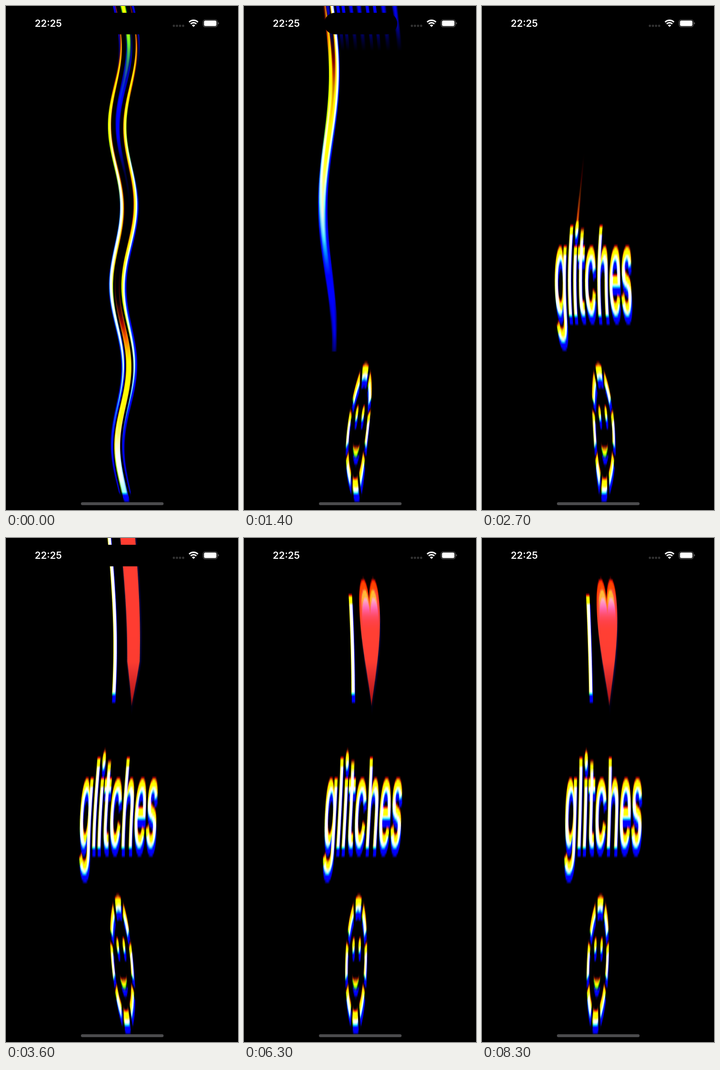
Animation of 480x1041 px, one loop 8.4 s. Source, as an HTML page with a canvas:

```html
<!DOCTYPE html>
<html lang="en">
<head>
<meta charset="utf-8">
<title>I love glitches</title>
<style>
  html, body { margin: 0; width: 100%; height: 100%; overflow: hidden; background: #000; }
  canvas, svg { position: absolute; left: 0; top: 0; width: 480px; height: 1041px; }
  text { font: 600 20px Inter, Roboto, sans-serif; fill: #fff; }
</style>
</head>
<body>
<canvas id="stage" width="480" height="1041"></canvas>
<svg viewBox="0 0 480 1041">
  <rect x="166" y="14" width="151" height="44.5" rx="22"/>
  <text x="87.5" y="43" text-anchor="middle">22:25</text>
  <g fill="#333">
    <circle cx="347.3" cy="41" r="2.4"/><circle cx="353.7" cy="41" r="2.4"/>
    <circle cx="360.1" cy="41" r="2.4"/><circle cx="366.5" cy="41" r="2.4"/>
  </g>
  <g fill="none" stroke="#fff" stroke-width="2.8">
    <path d="M378.8 33.3a13 13 0 0 1 18.4 0M382.1 36.9a8.4 8.4 0 0 1 11.8 0"/>
  </g>
  <path fill="#fff" d="M388 43.3l-3.4-3.4a4.8 4.8 0 0 1 6.8 0z"/>
  <rect x="407.7" y="28.2" width="29.6" height="15" rx="4.6" fill="none" stroke="#666" stroke-width="1.1"/>
  <rect x="409.6" y="30" width="25.8" height="11.4" rx="3" fill="#fff"/>
  <path fill="#666" d="M438.6 33.3q2 .8 2 2.4t-2 2.4z"/>
  <rect x="155" y="1025" width="171" height="6" rx="3" fill="#4b4b4d"/>
</svg>
<script>
const W = 480, H = 1041;
const STRETCH = 6;        // vertical stretch of the artwork
const LOOP = 8400, STEP = 100;
const HELD = [23, 53, 60, 75];   // steps that repeat the one before

// Colour channels and how far each is pulled aside
const CHANNELS = [
  { color: '#f00', dx: 0, dy: -4 },
  { color: '#0f0', dx: 0, dy: 0 },
  { color: '#00f', dx: 1, dy: 16 }
];

function makeCanvas(w, h) {
  const c = document.createElement('canvas');
  c.width = w;
  c.height = h;
  return c.getContext('2d');
}

function heartPath(c) {
  c.beginPath();
  for (const s of [-1, 1]) {
    c.moveTo(0, 21.5);
    c.bezierCurveTo(2 * s, 17, 6 * s, 14.7, 10.5 * s, 14.7);
    c.bezierCurveTo(17 * s, 14.7, 21 * s, 19, 21 * s, 25.5);
    c.bezierCurveTo(21 * s, 37, 7 * s, 49, 0, 58.3);
    c.closePath();
  }
}

function drawHeart(c) {
  c.save();
  c.translate(252, 0);
  const body = c.createLinearGradient(0, 15, 0, 58);
  body.addColorStop(0, '#ff4638');
  body.addColorStop(0.65, '#ff3c30');
  body.addColorStop(1, '#a80c0a');
  c.fillStyle = body;
  heartPath(c);
  c.fill();

  const shine = c.createLinearGradient(0, 15, 0, 30);
  shine.addColorStop(0, 'rgba(255,205,215,.9)');
  shine.addColorStop(0.25, 'rgba(255,200,212,.85)');
  shine.addColorStop(0.5, 'rgba(255,190,205,.3)');
  shine.addColorStop(1, 'rgba(255,60,48,0)');
  c.fillStyle = shine;
  c.translate(0, 5.65);
  c.scale(0.82, 0.82);
  heartPath(c);
  c.fill();
  c.restore();
}

function drawFace(c) {
  c.save();
  c.translate(242, 145.8);
  c.strokeStyle = c.fillStyle = '#fff';
  c.lineWidth = 5;
  const half = 16.5 * Math.PI / 180;
  for (let i = 0; i < 8; i++) {
    const a = i * Math.PI / 4;
    c.beginPath();
    c.arc(0, 0, 19.8, a - half, a + half);
    c.stroke();
  }
  for (const x of [-6.4, 6.4]) {
    c.beginPath();
    c.ellipse(x, -5.2, 2.5, 2.5, 0, 0, 7);
    c.fill();
  }
  c.beginPath();
  c.moveTo(-7.3, 5.6);
  c.quadraticCurveTo(0, 8, 7.3, 5.6);
  c.quadraticCurveTo(0, 13.4, -7.3, 5.6);
  c.fill();
  c.restore();
}

function drawWord(c, word, x, y, size) {
  c.font = `700 ${size}px Inter, Roboto, sans-serif`;
  c.textAlign = 'center';
  c.fillStyle = '#fff';
  c.fillText(word, x, y);
}

// Flat artwork, then stretched with its colour channels pulled apart
function makeArt() {
  const flat = makeCanvas(W, Math.ceil(H / STRETCH) + 1);
  flat.fillRect(0, 0, W, H);
  drawWord(flat, 'I', 213.5, 324 / STRETCH, 47);
  drawHeart(flat);
  flat.letterSpacing = '-0.8px';
  drawWord(flat, 'glitches', 241.3, 644 / STRETCH, 43);
  drawFace(flat);

  const art = makeCanvas(W, H);
  art.globalCompositeOperation = 'lighter';
  for (const { color, dx, dy } of CHANNELS) {
    const layer = makeCanvas(W, H);
    layer.drawImage(flat.canvas, 0, 0, W, flat.canvas.height * STRETCH);
    layer.globalCompositeOperation = 'multiply';
    layer.fillStyle = color;
    layer.fillRect(0, 0, W, H);
    art.drawImage(layer.canvas, dx, dy);
  }
  return art.canvas;
}

const art = makeArt();
const ctx = document.getElementById('stage').getContext('2d');

// Rows above the scan line smear the rows just behind it; a widening wave bends all
function draw(sec) {
  const scan = 1003 - 208 * sec;
  const wave = 52.6 + 25 * sec;
  ctx.fillStyle = '#000';
  ctx.fillRect(0, 0, W, H);
  for (let y = 0; y < H; y++) {
    const from = y < scan ? scan - (scan - y) * 0.082 : y;
    ctx.drawImage(art, 0, from, W, 1, 12 * Math.sin(y / wave), y, W, 1);
  }
}

const start = performance.now();
let shown = -1;

function tick() {
  let n = Math.floor(((performance.now() - start) % LOOP) / STEP);
  if (HELD.includes(n)) n--;
  if (n !== shown) {
    shown = n;
    draw(n * STEP / 1000);
  }
  requestAnimationFrame(tick);
}
tick();
</script>
</body>
</html>
```
